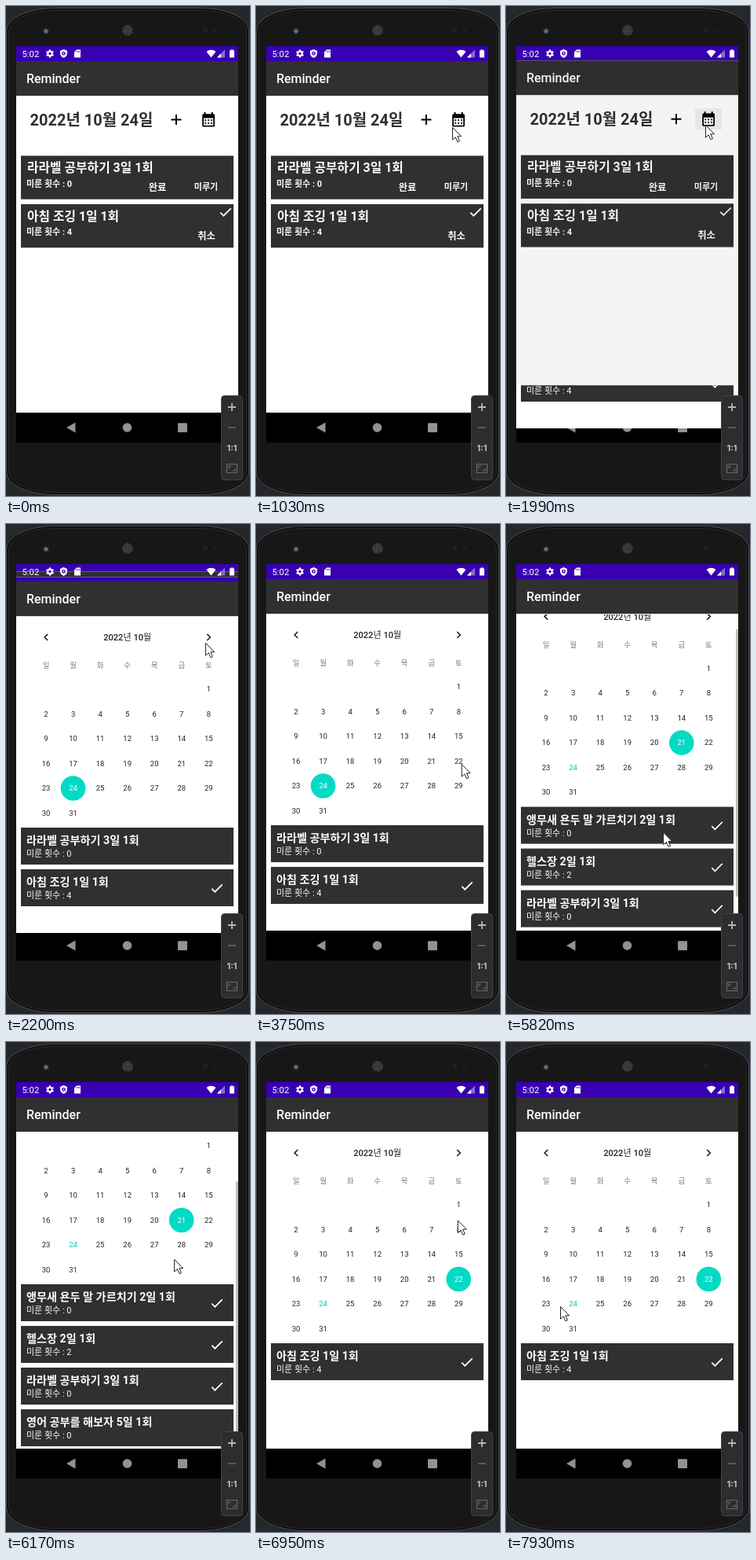
These frames come from a looping animation (311x623 px, 8000 ms). An HTML page with a canvas:

```html
<!DOCTYPE html>
<html lang="ko">
<head>
<meta charset="utf-8">
<style>
html, body { margin: 0; width: 100%; height: 100%; overflow: hidden; background: #26272a; }
canvas { display: block; width: 311px; height: 623px; }
</style>
</head>
<body>
<canvas id="stage"></canvas>
<script>
const canvas = document.getElementById('stage');
const g = canvas.getContext('2d');
const dpr = window.devicePixelRatio || 1;
canvas.width = 311 * dpr;
canvas.height = 623 * dpr;

const LOOP = 8000, DARK = '#303030', PURPLE = '#3700b3', TEAL = '#03dac5';
const FONT = 'Roboto, "Noto Sans CJK KR", "Noto Sans CJK", sans-serif';
const OPEN = 1973, PICK21 = 4680, PICK22 = 6830;

const laravel = '라라벨 공부하기 3일 1회', jog = '아침 조깅 1일 1회';
const tasks = {
  24: [[laravel, 0, 0], [jog, 4, 1]],
  21: [['앵무새 욘두 말 가르치기 2일 1회', 0, 1], ['헬스장 2일 1회', 2, 1], [laravel, 0, 1], ['영어 공부를 해보자 5일 1회', 0, 0]],
  22: [[jog, 4, 1]]
};

// time, x, y of the pointer tip
const path = [
  [190, 287, 554], [480, 232, 390], [700, 218, 265], [960, 250, 156], [1030, 250, 154],
  [1180, 252, 152], [1440, 252, 152], [1580, 254, 151], [2220, 254, 151], [2760, 92, 322],
  [3000, 71, 337], [3250, 150, 352], [3610, 262, 306], [3750, 262, 305], [3890, 218, 306],
  [4090, 218, 306], [4840, 239, 302], [4910, 239, 302], [5150, 249, 350], [5400, 225, 438],
  [5680, 196, 425], [5750, 197, 420], [6000, 208, 320], [6170, 214, 276], [6400, 235, 245],
  [6650, 257, 226], [6950, 257, 226], [7200, 215, 330], [7400, 208, 400], [7600, 150, 423],
  [7930, 69, 336], [8000, 69, 336]
];

const clamp = (v, a = 0, b = 1) => Math.min(b, Math.max(a, v));

function pointer(t) {
  const i = path.findIndex(p => p[0] > t);
  if (i < 1) return null;
  const [t0, x0, y0] = path[i - 1], [t1, x1, y1] = path[i];
  const k = (t - t0) / (t1 - t0);
  return [x0 + (x1 - x0) * k, y0 + (y1 - y0) * k];
}

function box(x, y, w, h, color) {
  g.fillStyle = color;
  g.fillRect(x, y, w, h);
}

function round(x, y, w, h, r, fill, stroke) {
  g.beginPath();
  g.roundRect(x, y, w, h, r);
  if (fill) { g.fillStyle = fill; g.fill(); }
  if (stroke) { g.strokeStyle = stroke; g.lineWidth = 1; g.stroke(); }
}

function disc(x, y, r, color) {
  g.fillStyle = color;
  g.beginPath();
  g.arc(x, y, r, 0, 7);
  g.fill();
}

function text(s, x, mid, size, color, weight = 400, align = 'left', font = FONT) {
  g.font = `${weight} ${size}px ${font}`;
  g.textAlign = align;
  g.fillStyle = color;
  g.fillText(s, x, mid + size * 0.355);
}

function line(d, x, y, width, color) {
  g.save();
  g.translate(x, y);
  g.strokeStyle = color;
  g.lineWidth = width;
  g.stroke(new Path2D(d));
  g.restore();
}

function shape(d, x, y, color) {
  g.save();
  g.translate(x, y);
  g.fillStyle = color;
  g.fill(new Path2D(d));
  g.restore();
}

function clipped(x, y, w, h, draw) {
  g.save();
  g.beginPath();
  g.rect(x, y, w, h);
  g.clip();
  draw();
  g.restore();
}

const check = (x, y) => line('M-6.7 .6L-2.7 4.7L6.7 -4.7', x, y, 1.66, '#fff');

function phone() {
  box(0, 0, 311, 623, '#26272a');
  round(0.5, 2.5, 309, 619, { x: 62, y: 29 }, '#101011', '#4c4c4e');
  round(3.5, 5.5, 303, 613, { x: 59, y: 27 }, '#171718', '#29292b');
  disc(51, 32, 4.5, '#24252b');
  disc(51, 32, 2.5, '#6c6f7a');
  disc(155, 31, 7, '#303032');
  for (let i = 0; i < 18; i++) {
    const a = i * 2.4, r = 1.45 * Math.sqrt(i);
    disc(155 + r * Math.cos(a), 31 + r * Math.sin(a), 0.6, '#6b6b6d');
  }
  disc(254, 31, 3, '#202023');
  disc(266, 31, 2, '#202023');
}

function statusIcons() {
  text('5:02', 20.5, 61, 11.3, '#fff');
  disc(56, 60.5, 3.7, '#fff');
  for (let i = 0; i < 6; i++) {
    const a = i * Math.PI / 3 + 0.5;
    disc(56 + 4 * Math.cos(a), 60.5 + 4 * Math.sin(a), 1.2, '#fff');
  }
  disc(56, 60.5, 1.7, PURPLE);
  shape('M0 -5.5L4.5 -3.5V0Q4 4 0 5.5Q-4 4 -4.5 0V-3.5Z', 73.5, 60.5, '#fff');
  disc(73.5, 60.3, 2.4, PURPLE);
  disc(73.5, 60.3, 1, '#fff');
  shape('M-4 -2L-1 -5H4V5H-4Z', 91, 60.5, '#fff');
  line('M-1 -3.5V-1.5M.8 -3.5V-1.5M2.6 -3.5V-1.5', 91, 60.5, 0.8, PURPLE);
  shape('M-6 -2.5Q0 -7 6 -2.5L0 5Z', 261.5, 60.5, '#fff');
  shape('M5 -5V5H-5Z', 274, 60.5, '#8a6ad2');
  shape('M0 0V5H-5Z', 274, 60.5, '#fff');
  shape('M-3 -4H-1.5V-5H1.5V-4H3V5H-3Z', 288, 60.5, '#fff');
}

function navBar() {
  box(13, 517, 283, 38, '#000');
  const c = '#929292';
  shape('M-6 0L5.5 -6.5V6.5Z', 83, 536, c);
  disc(154.5, 536, 5.8, c);
  round(219, 530.2, 12, 11.8, 1, c);
}

function frame(height) {
  box(13, 51, 283, height, '#fff');
  box(13, 51, 283, 19, PURPLE);
}

function appBar() {
  box(13, 70, 283, 44, DARK);
  box(13, 114, 283, 1, '#dcdcdc');
  text('Reminder', 26, 92.5, 16, '#fff', 500);
}

function homeTask(y, name, count) {
  box(19, y, 271, 55.3, DARK);
  text(name, 27, y + 15, 15.8, '#fff', 700);
  text('미룬 횟수 : ' + count, 26, y + 35.5, 11, '#fff', 700);
}

function home(t) {
  frame(480);
  appBar();
  text('2022년 10월 24일', 30.5, 145, 20, DARK, 700);
  line('M-6.5 0H6.5M0 -6.5V6.5', 217, 144.6, 2, '#000');
  const press = clamp((t - 1560) / 200);
  box(241, 131, 34, 27, `rgba(0,0,0,${0.06 * press})`);
  round(250.2, 137.2, 15.8, 16.4, 1.5, '#000');
  box(252, 142.5, 12.2, 9.3, '#fff');
  box(252.5, 135, 2, 3, '#000');
  box(261.7, 135, 2, 3, '#000');
  for (let i = 0; i < 6; i++) box(253.3 + i % 3 * 3.9, 144.2 + (i > 2) * 3.7, 1.9, 1.9, '#000');
  homeTask(190.4, laravel, 0);
  text('완료', 193, 231, 12.3, '#fff', 700, 'center');
  text('미루기', 255, 230.5, 11, '#fff', 700, 'center');
  homeTask(252, jog, 4);
  text('취소', 255.5, 292.5, 12.3, '#fff', 700, 'center');
  check(280, 262);
}

function calendar(t) {
  const day = t < PICK21 ? 24 : t < PICK22 ? 21 : 22;
  const scroll = day === 21 && t > 5750 ? clamp(415 - pointer(t)[1], 0, 75) : 0;
  const colX = c => 51 + 34.55 * c, rowY = r => 207 + 31.5 * r;
  frame(466);
  clipped(13, 114, 283, 403, () => {
    g.save();
    g.translate(0, -scroll);
    line('M2.2 -4L-1.8 0L2.2 4', 51, 141, 1.7, '#222');
    line('M-2.2 -4L1.8 0L-2.2 4', 258.5, 141, 1.7, '#222');
    text('2022년 10월', 154.7, 141, 11.1, '#222', 500, 'center');
    [...'일월화수목금토'].forEach((s, c) => text(s, colX(c), 177, 9.5, '#7d7d7d', 400, 'center'));
    for (let d = 1; d <= 31; d++) {
      const x = colX((d + 5) % 7), y = rowY(Math.floor((d + 5) / 7));
      if (d === day) disc(x, y, 15.8, TEAL);
      text(d, x, y, 9.5, d === day ? '#fff' : d === 24 ? '#08c4b6' : '#222', 400, 'center');
    }
    tasks[day].forEach(([name, count, done], i) => {
      const y = 383 + 53 * i;
      box(19, y, 271, 47, DARK);
      text(name, 26, y + 16, 14.15, '#fff', 700);
      text('미룬 횟수 : ' + count, 26, y + 33.5, 11, '#fff');
      if (done) check(269, y + 24);
    });
    g.restore();
    if (day === 21) {
      const alpha = clamp((6500 - t) / 250);
      box(293, 114 + scroll * 0.843, 3, 340, `rgba(125,125,125,${0.5 * alpha})`);
    }
  });
  appBar();
}

function toolPanel() {
  round(274.5, 495.5, 27, 107, 4, '#2c2d2f', '#414244');
  line('M-5 0H5M0 -5V5', 288, 510, 1.8, '#b4b6b8');
  line('M-5 0H5', 288, 536, 1.5, '#68696b');
  text('1:1', 288, 562, 11, '#c0c2c4', 700, 'center', 'Inter, sans-serif');
  line('M-6.5 -5.5H6.5V5.5H-6.5ZM-4 0V-3H-1M4 0V3H1', 288, 588, 1.2, '#68696b');
}

function cursor(x, y) {
  const d = 'M.5 .5V16.2L4.2 12.8L6.9 18.8L9.4 17.7L6.8 11.8H11.6Z';
  shape(d, x, y, '#fff');
  line(d, x, y, 1, '#222');
}

function draw(t) {
  g.setTransform(dpr, 0, 0, dpr, 0, 0);
  phone();
  clipped(13, 51, 283, 504, () => {
    const p = clamp((t - OPEN) / 425);
    if (p < 1) {
      g.save();
      g.translate(0, -Math.min(10, 18 * p));
      home(t);
      g.restore();
      box(13, 70, 283, 447, `rgba(0,0,0,${0.045 * clamp(p * 25)})`);
    }
    navBar();
    if (p > 0) {
      const shift = Math.round(22 * (1 - p) ** 2.4);
      g.translate(0, shift);
      clipped(13, 51 + 504 * (1 - p) ** 4.7, 283, 504, () => calendar(t));
      g.translate(0, -shift);
    }
    statusIcons();
  });
  toolPanel();
  const tip = pointer(t);
  if (tip) cursor(...tip);
}

const start = performance.now();
function tick() {
  draw((performance.now() - start) % LOOP);
  requestAnimationFrame(tick);
}
tick();
</script>
</body>
</html>
```
